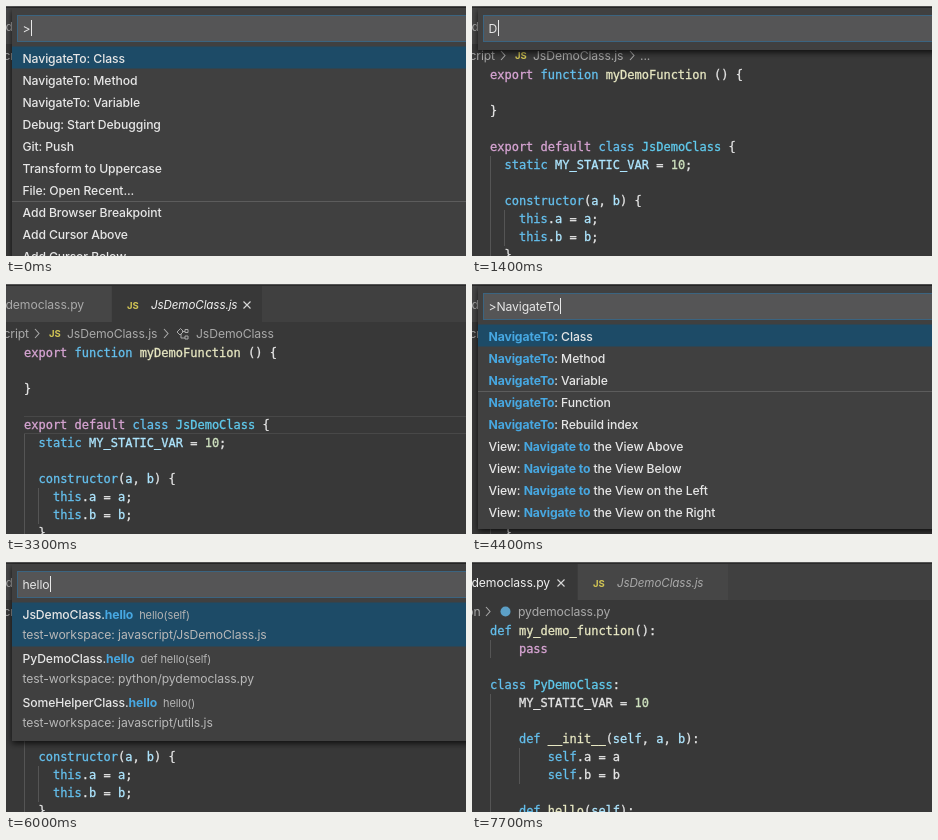
Recreate the animation shown at these times as an HTML page. Size 460 by 250 pixels, loop 7.8 s.

```html
<!DOCTYPE html>
<html lang="en">
<head>
<meta charset="utf-8">
<title>Navigate to symbol</title>
<style>
  html, body { margin: 0; width: 100%; height: 100%; overflow: hidden; background: #383838; }
  svg { display: block; width: 460px; height: 250px; }
  text { white-space: pre; font: 12.2px Inter, "Open Sans", sans-serif; letter-spacing: -.1px; }
  .code { font: 12px "DejaVu Sans Mono", "Liberation Mono", monospace; letter-spacing: 0; stroke-width: .3px; }
  .label { font-weight: 500; }
  .tab { font-size: 11.6px; font-style: italic; }
  .badge { font-size: 9.5px; font-weight: 700; fill: #d2c554; }
  .hit { font-weight: 700; fill: #47a8e2; }
  .note { font-size: 11px; font-weight: 400; fill: #b4b4b4; }
</style>
</head>
<body>
<svg viewBox="0 0 460 250">
  <defs>
    <filter id="shadow" x="-10%" y="-20%" width="120%" height="150%">
      <feDropShadow dx="0" dy="2.5" stdDeviation="3" flood-color="#000" flood-opacity=".75"/>
    </filter>
  </defs>
  <g id="editor"></g>
  <g id="palette"></g>
</svg>
<script>
const LOOP = 7800;
const C = {
  pink: '#d9a6d5', blue: '#64c0ee', yellow: '#e8e8c3', type: '#60cbee',
  name: '#aee6ff', num: '#cde0be', plain: '#e6e6e6', dim: '#a9a9a9'
};
const editor = document.getElementById('editor');
const palette = document.getElementById('palette');

const rect = (x, y, w, h, fill, extra = '') =>
  `<rect x="${x}" y="${y}" width="${w}" height="${h}" fill="${fill}" ${extra}/>`;
const text = (x, y, body, fill, extra = '') =>
  `<text x="${x}" y="${y}" fill="${fill}" ${extra}>${body}</text>`;
const path = (d, color, width = 1) =>
  `<path d="${d}" fill="none" stroke="${color}" stroke-width="${width}"/>`;
const esc = s => s.replace(/&/g, '&amp;').replace(/</g, '&lt;').replace(/>/g, '&gt;');

// ---- Code ----
const JS_CODE = `export function myDemoFunction () {

}

export default class JsDemoClass {
  static MY_STATIC_VAR = 10;

  constructor(a, b) {
    this.a = a;
    this.b = b;
  }`;
const PY_CODE = `def my_demo_function():
    pass

class PyDemoClass:
    MY_STATIC_VAR = 10

    def __init__(self, a, b):
        self.a = a
        self.b = b

    def hello(self):`;

const WORDS = {};
const group = (color, list) => list.split(' ').forEach(w => WORDS[w] = color);
group(C.pink, 'export default pass');
group(C.blue, 'function class static constructor this def self');
group(C.yellow, 'myDemoFunction my_demo_function __init__ hello');
group(C.type, 'JsDemoClass PyDemoClass');
group(C.num, '10');

function codeLine(line, i, python) {
  const params = python && line.includes('def ');
  const spans = (line.match(/\w+|\W+/g) || []).map(tok => {
    let color = C.plain;
    if (/\w/.test(tok)) {
      color = WORDS[tok] || (python && !params ? C.plain : C.name);
      if (params && tok === 'self') color = C.name;
    }
    return `<tspan fill="${color}" stroke="${color}">${esc(tok)}</tspan>`;
  });
  return text(18, 73.4 + 18 * i, spans.join(''), C.plain, 'class="code"');
}
const code = (src, python) =>
  src.split('\n').map((line, i) => codeLine(line, i, python)).join('');
const guide = (x, y1, y2) => path(`M${x + .5} ${y1}V${y2}`, '#555');

// ---- Editor chrome ----
const chevron = x => path(`M${x - 2} 45l4 4.5l-4 4.5`, C.dim, 1.1);
const cross = x => path(`M${x - 3.5} 17.5l7 7m0-7l-7 7`, '#d8d8d8', 1.1);
const classIcon = x =>
  path(`M${x + 1} 48l3.5-3.5l3 3l-3.5 3.5zM${x + 6} 47.5h3M${x + 5} 50v4h4M${x + 9} 45.5h3v3h-3zM${x + 9} 52h3v3h-3z`, C.dim);

function tabs(python) {
  const on = '#383838', off = '#464646';
  return rect(0, 0, 460, 38, '#404040') +
    rect(0, 2, 105.5, 36, python ? on : off) +
    rect(106, 2, 150, 36, python ? off : on) +
    rect(0, 0, 460, 1, '#555') +
    rect(0, 1, 460, 1, '#2a2a2a') +
    text(-.5, 25.4, 'democlass.py', python ? '#f0f0f0' : C.dim) +
    text(121, 24.6, 'JS', '', 'class="badge"') +
    text(145, 25.2, 'JsDemoClass.js', python ? C.dim : '#f0f0f0', 'class="tab"') +
    cross(python ? 89 : 241);
}

function jsEditor(inClass) {
  let out = tabs(false) +
    text(23, 53.6, 'javascript', C.dim, 'text-anchor="end"') + chevron(31) +
    text(43, 52.8, 'JS', '', 'class="badge"') +
    text(61, 53.6, 'JsDemoClass.js', C.dim) + chevron(160);
  out += inClass
    ? classIcon(170) + text(190, 53.6, 'JsDemoClass', C.dim) +
      path('M18 132.5H460M18 149.5H460', '#484848')
    : text(168, 53.6, '...', C.dim);
  return out + guide(18, 150, 250) + guide(32, 204, 240) + code(JS_CODE, false);
}

function pyEditor() {
  return tabs(true) +
    text(8.5, 53.6, 'python', C.dim, 'text-anchor="end"') + chevron(16) +
    '<circle cx="33.5" cy="49.5" r="5" fill="#5c9fc6"/>' +
    text(46, 53.6, 'pydemoclass.py', C.dim) +
    guide(18, 78, 96) + guide(18, 132, 250) + guide(47, 186, 222) + code(PY_CODE, true);
}

// ---- Palette ----
const NAV = ['Class', 'Method', 'Variable'].map(s => 'NavigateTo: ' + s);
const RECENT = [...NAV, 'Debug: Start Debugging', 'Git: Push', 'Transform to Uppercase',
  'File: Open Recent...', 'Add Browser Breakpoint', 'Add Cursor Above', 'Add Cursor Below'];
const FOUND = [...NAV, 'NavigateTo: Function', 'NavigateTo: Rebuild index',
  ...['View Above', 'View Below', 'View on the Left', 'View on the Right']
    .map(s => 'View: Navigate to the ' + s)];
const JS_FILE = 'javascript/JsDemoClass.js', PY_FILE = 'python/pydemoclass.py';
const CLASSES = [
  ['JsDemoClass', 'class JsDemoClass', JS_FILE],
  ['PyDemoClass', 'class PyDemoClass', PY_FILE]
];
const METHODS = [
  ['JsDemoClass.hello', 'hello(self)', JS_FILE],
  ['PyDemoClass.hello', 'def hello(self)', PY_FILE],
  ['SomeHelperClass.hello', 'hello()', 'javascript/utils.js']
];

// Marks the query inside a label, ignoring case and spaces.
function mark(label, query) {
  if (!query) return esc(label);
  const m = label.match(new RegExp([...query].join(' ?'), 'i'));
  if (!m) return esc(label);
  const end = m.index + m[0].length;
  return esc(label.slice(0, m.index)) + `<tspan class="hit">${m[0]}</tspan>` + esc(label.slice(end));
}

const label = (y, body) => text(16.5, y, body, '#e6e6e6', 'class="label"');
const selection = (sel, h) => rect(6, 40.5 + h * sel, 454, h, '#1d4b67');

function commandRows(query, sel) {
  const list = query ? FOUND : RECENT;
  const split = 41 + 22 * (query ? 3 : 7) + .5;
  return selection(sel, 22) +
    path(`M6 ${split}H460`, '#5c5c5c') +
    list.map((s, i) => label(56.6 + 22 * i, mark(s, query))).join('');
}

function symbolRows(list, query, sel) {
  return selection(sel, 44) +
    list.map(([name, note, file], i) => {
      const y = 56.6 + 44 * i;
      return label(y, `${mark(name, query)}<tspan dx="6" class="note">${note}</tspan>`) +
        text(16.5, y + 20.8, 'test-workspace: ' + file, '#b8b8b8');
    }).join('');
}

function drawPalette({ input, hint, list, sel = 0 }) {
  const command = input[0] === '>';
  const rows = command ? commandRows(input.slice(1), sel)
    : list ? symbolRows(list, input, sel) : '';
  const bottom = command ? (input.length > 1 ? 245 : 275) : list ? 47 + 44 * list.length : 44;
  palette.innerHTML =
    rect(6, 2, 470, bottom - 2, '#404041', 'filter="url(#shadow)"') +
    rect(11.5, 9.5, 460, 26, '#555556', 'stroke="#3b6480"') +
    rows +
    (hint ? text(16.5, 26.8, hint, '#a8a8a8') : '') +
    text(16.5, 26.8, esc(input), '#e6e6e6', 'id="typed"');
  const w = input ? document.getElementById('typed').getComputedTextLength() : 0;
  palette.insertAdjacentHTML('beforeend', rect(17 + Math.round(w), 14, 1, 16, '#e8e8e8'));
}

// ---- Timeline: [start, editor, palette] ----
const top0 = () => jsEditor(false), inClass = () => jsEditor(true);
const steps = [];
const at = (time, view, box) => steps.push([time, view, box]);
const typeWord = (word, view, keys, list) =>
  keys.forEach(([time, n]) => at(time, view, { input: word.slice(0, n), list: n > 1 ? list : null }));

const COMMAND = '>NavigateTo';
typeWord(COMMAND, top0, [[0, 1], [100, 2], [200, 4], [300, 6], [400, 8], [600, 11]]);
at(800, top0, { input: '', hint: 'Search for classes' });
typeWord('Demo', top0, [[1300, 1], [1500, 2], [1600, 3], [1700, 4]], CLASSES);
at(2300, inClass);
typeWord(COMMAND, inClass, [[3400, 1], [3900, 2], [4000, 3], [4100, 5], [4200, 7], [4300, 9], [4400, 11]]);
at(4500, inClass, { input: COMMAND, sel: 1 });
at(4700, inClass, { input: '', hint: 'Search for methods' });
typeWord('hello', inClass, [[5200, 1], [5400, 2], [5500, 3], [5600, 4], [5700, 5]], METHODS);
at(6300, inClass, { input: 'hello', list: METHODS, sel: 1 });
at(6700, inClass);
at(7100, pyEditor);

let shown = null;
function render(time) {
  const t = time % LOOP;
  const step = steps.filter(s => s[0] <= t).pop();
  if (step === shown) return;
  if (!shown || shown[1] !== step[1]) editor.innerHTML = step[1]();
  if (step[2]) drawPalette(step[2]);
  else palette.innerHTML = '';
  shown = step;
}

const start = performance.now();
function tick() {
  render(performance.now() - start);
  requestAnimationFrame(tick);
}
tick();
</script>
</body>
</html>
```
